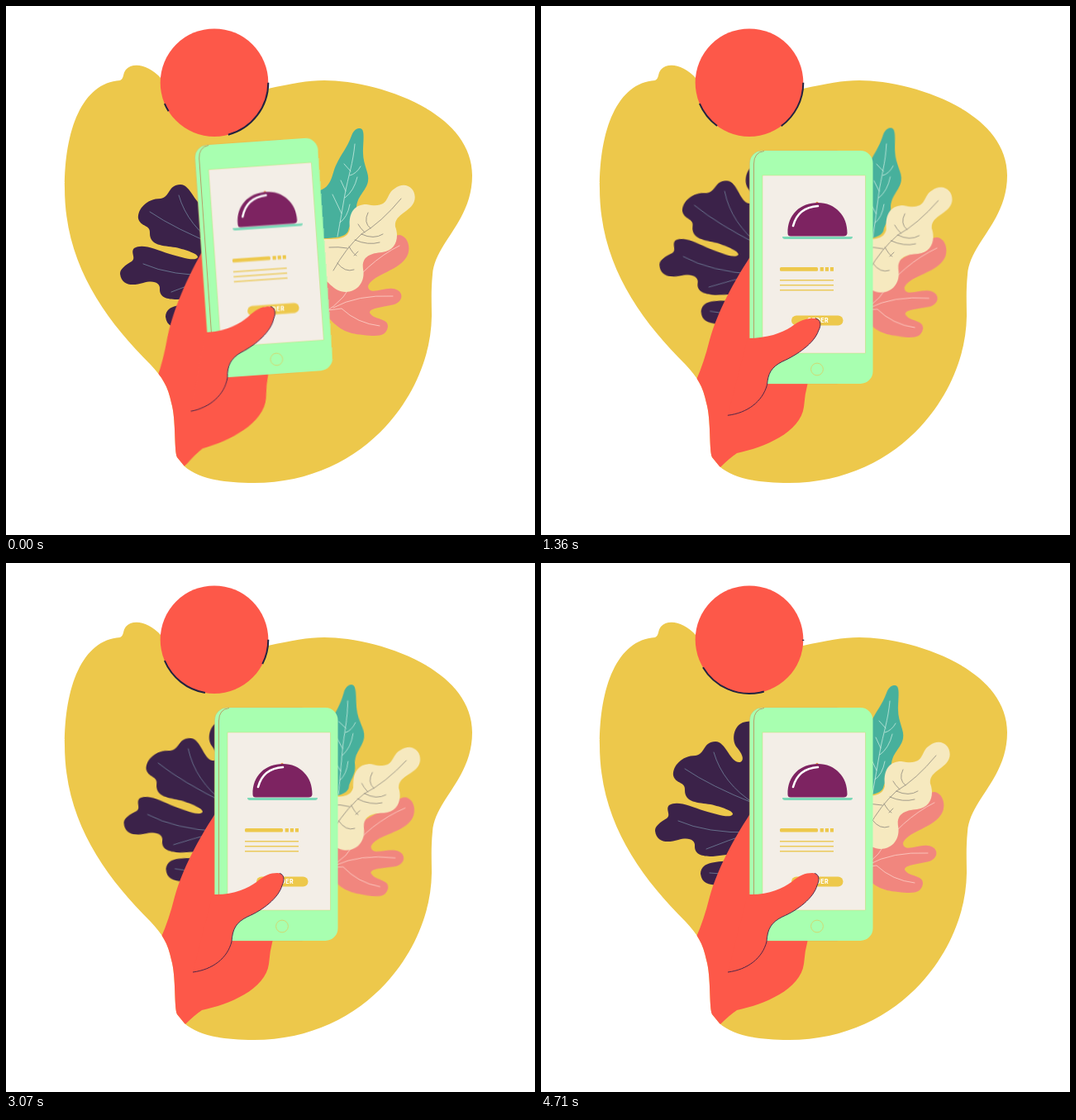
Recreate the animation shown at these times as an HTML page without scripts. Size 640x640 px, loop 4780 ms.

```html
<!DOCTYPE html>
<html lang="en">
<head>
<meta charset="utf-8">
<title>Ordering food by phone</title>
<style>
  html, body { margin: 0; height: 100%; overflow: hidden; background: #fff; }
  svg { display: block; width: 100%; height: 100%; }

  .leaf, .frond, .grip, .feed, .thumb, .button, .ring {
    animation: 4.78s cubic-bezier(.37, 0, .63, 1) infinite;
  }
  .veins { fill: none; stroke-width: .8; stroke-linecap: round; }
  .skin { fill: #fd5849; }

  .leaf { animation-name: sway; }
  .teal { transform-origin: 415px 265px; --right: -5.2deg; --left: 4.2deg; }
  .cream { transform-origin: 387px 335px; --right: 3.8deg; --left: -3.8deg; }
  .pink { transform-origin: 383px 395px; --right: 4deg; --left: -3.6deg; }
  @keyframes sway {
    0%, 100% { transform: rotate(0deg); }
    20.9%, 62.6% { transform: rotate(var(--right)); }
    41.3%, 80.1% { transform: rotate(var(--left)); }
  }

  .frond { transform-origin: 271px 380px; animation-name: fan; }
  @keyframes fan {
    0%, 100% { transform: rotate(0deg); }
    18.8% { transform: rotate(7deg); }
    42.9% { transform: rotate(1deg); }
    64.2% { transform: rotate(4.3deg); }
  }

  .grip { transform-origin: 158px 528px; animation-name: raise; }
  @keyframes raise {
    0% { transform: rotate(-4deg); }
    16.7%, 100% { transform: rotate(0deg); }
  }

  .feed { animation-name: scroll; }
  @keyframes scroll {
    0% { transform: translateY(-1.5px); }
    18%, 28.2% { transform: translateY(0); }
    58.2%, 100% { transform: translateY(210px); }
  }

  .thumb {
    stroke: #3b2249; stroke-width: .9;
    stroke-dasharray: 0 33 67; animation-name: swipe;
  }
  @keyframes swipe {
    0%, 26%, 50.4%, 100% {
      d: path("M250 401C275 402 292 394 303 386C312 378 320 375 328 375C336 375 338 382 334 390C330 405 311 420 292 428C278 435 274 443 273 458C268 478 250 492 226 495");
    }
    36.6%, 38.5% {
      d: path("M250 409C268 402 285 407 300 404C312 401 324 397 337 396C350 396 355 402 347 413C336 426 306 436 291 445C280 452 280 456 277 461C268 482 248 495 225 497");
    }
  }

  .button { fill: #edc84b; animation-name: press; }
  @keyframes press {
    0%, 74%, 82%, 100% { fill: #edc84b; }
    77%, 79% { fill: #dfb74a; }
  }
  .label { font: 800 7px Inter, "Open Sans", sans-serif; letter-spacing: .4px; fill: #fff; }

  .ring {
    fill: none; stroke: #232340; stroke-width: 2; stroke-dasharray: 75 73;
    animation-name: orbit; animation-timing-function: linear;
  }
  @keyframes orbit { to { stroke-dashoffset: 75; } }
</style>
</head>
<body>
<svg viewBox="0 0 640 640">
  <defs>
    <path id="blob" d="M71 220C71 150 92 93 138 90C143 88 141 82 145 77C153 68 172 70 188 88L317 100C345 94 365 90 385 90C446 90 564 126 564 205C564 261 519 286 516 325C514 345 515 360 515 375C514 470 432 577 300 577C260 577 232 571 216 557L207 546C203 538 206 500 200 480C196 460 189 449 175 434C118 377 71 311 71 220Z"/>
    <clipPath id="inBlob"><use href="#blob"/></clipPath>
    <clipPath id="inScreen"><path d="M268 205H392V420H268Z"/></clipPath>

    <!-- The order button takes its fill from the use element. -->
    <g id="dish">
      <circle cx="334" cy="238.300" r="1.600" fill="#e9913f"/>
      <path fill="#7d2361" d="M298.500 275C298 252 314 238 335 238C356 238 371 254 370.500 275Q370 278.500 366 278.500H302Q298.500 278.500 298.500 275Z"/>
      <path fill="none" stroke="#fff" stroke-width="2.600" stroke-linecap="round" d="M305 266C309 251 319 243 335 242"/>
      <path fill="#7cd9b8" d="M292 279H377Q377 282 374 282H295Q292 282 292 279Z"/>
      <rect x="289" y="316" width="46" height="4.600" rx="1.500" fill="#edc84b"/>
      <path fill="none" stroke="#edc84b" stroke-width="4.600" stroke-dasharray="4.200 1.900" d="M337.700 318.300H354"/>
      <path fill="none" stroke="#ebca5c" stroke-width="1.500" d="M289 331.700H354M289 337.700H354M289 343.700H354"/>
      <rect x="303" y="374.500" width="62.500" height="12" rx="6"/>
      <text class="label" x="322" y="383">ORDER</text>
    </g>
  </defs>

  <use href="#blob" fill="#edc84b"/>

  <g class="leaf teal">
    <path fill="#47b09c" d="M372 225C396 222 393 204 400 191C405 180 413 171 418 157C421 149 425 148 428 148C435 148 432 163 432 178C432 192 440 203 438 212C436 224 424 230 424 245C424 258 416 262 414 272C410 282 390 281 370 281Z"/>
    <path class="veins" stroke="#c9ebe0" d="M422 167C420 190 414 206 410 228Q406 252 401 279M417 200L409 191M416 205Q424 203 429 194M411 224L405 211M410 232Q421 224 425 207M406 251L395 228M404 262Q413 256 416 240"/>
  </g>

  <g class="leaf pink">
    <path fill="#f1867e" d="M380 340L440 300C460 290 466 277 476 277C488 279 491 297 483 306C472 321 442 326 438 339C439 351 457 340 468 342C480 343 483 356 470 361C458 364 440 365 440 371C444 380 463 377 462 388C460 400 450 400 432 398C412 396 402 392 384 370Z"/>
    <path class="veins" stroke="#fbd3cb" d="M476 290C450 303 425 325 408 352Q397 364 384 372M468 351Q425 349 396 365M452 387Q425 384 406 366L390 368"/>
  </g>

  <g class="leaf cream">
    <path fill="#f6e9bf" d="M378 283C394 280 412 286 416 270C414 252 420 240 436 240C466 246 458 228 470 221C484 210 498 222 494 236C490 249 469 252 471 267C476 280 472 296 455 298C440 299 430 304 432 318C435 334 425 346 411 346C396 346 388 330 378 325Z"/>
    <path class="veins" stroke="#8b867c" d="M478 233Q454 262 430 276Q411 293 396 320M441 269Q432 262 438 250M434 274Q428 268 426 264M430 276Q445 283 456 276M422 283Q438 290 452 286M413 293Q402 291 391 292M415 291Q420 300 424 302M421 302L426 297M401 311Q410 323 421 319"/>
  </g>

  <g class="frond">
    <path fill="#3b2249" d="M280 190C262 190 252 191 244 193C234 197 230 212 236 222C243 230 247 238 241 241C229 243 224 216 211 216C196 216 199 231 187 233C170 233 159 246 160 257C163 268 175 264 174 275C174 290 190 290 205 292C218 295 233 300 232 304C229 310 210 303 198 300C180 294 165 287 155 293C150 298 158 305 152 309C144 314 138 318 138 324C140 340 155 338 166 335C180 331 187 336 186 343C186 354 198 355 208 355L232 352V360C214 362 194 360 193 376C195 392 210 390 230 389L280 380Z"/>
    <path class="veins" stroke="#71849c" d="M174 249Q205 270 258 291M209 229Q220 267 258 291M166 312Q200 327 255 326M200 346Q225 336 255 326M204 375Q225 378 255 370"/>
  </g>

  <g clip-path="url(#inBlob)">
    <g class="grip">
      <path class="skin" d="M262 290C238 325 215 365 204 404Q197 432 188 452L150 480V610L217 558Q228 547 237 541C270 534 314 516 318 485Q319 470 323 455V400Z"/>
      <rect x="252.300" y="175" width="120" height="282" rx="15" fill="#a8ffb0" stroke="#dba95c" stroke-width=".5"/>
      <rect x="257.300" y="175" width="144.200" height="282" rx="15" fill="#a8ffb0"/>
      <path fill="none" stroke="#b98a55" stroke-width=".8" d="M270 175.500Q257.500 177 257.500 191V420"/>
      <rect x="268" y="205" width="124.300" height="215" fill="#f3eee7" stroke="#dccb68" stroke-width=".4"/>
      <g clip-path="url(#inScreen)">
        <g class="feed">
          <use class="button" href="#dish"/>
          <use class="button" href="#dish" y="-205"/>
        </g>
      </g>
      <circle cx="334" cy="439.500" r="7.400" fill="none" stroke="#cfd873"/>
      <path class="skin thumb" pathLength="100" d="M250 401C275 402 292 394 303 386C312 378 320 375 328 375C336 375 338 382 334 390C330 405 311 420 292 428C278 435 274 443 273 458C268 478 250 492 226 495"/>
    </g>
  </g>

  <circle class="skin" cx="252" cy="92.700" r="65.300"/>
  <path class="ring" pathLength="157" d="M317.300 92.700A65.300 65.300 0 0 1 191.900 118.200"/>
</svg>
</body>
</html>
```
